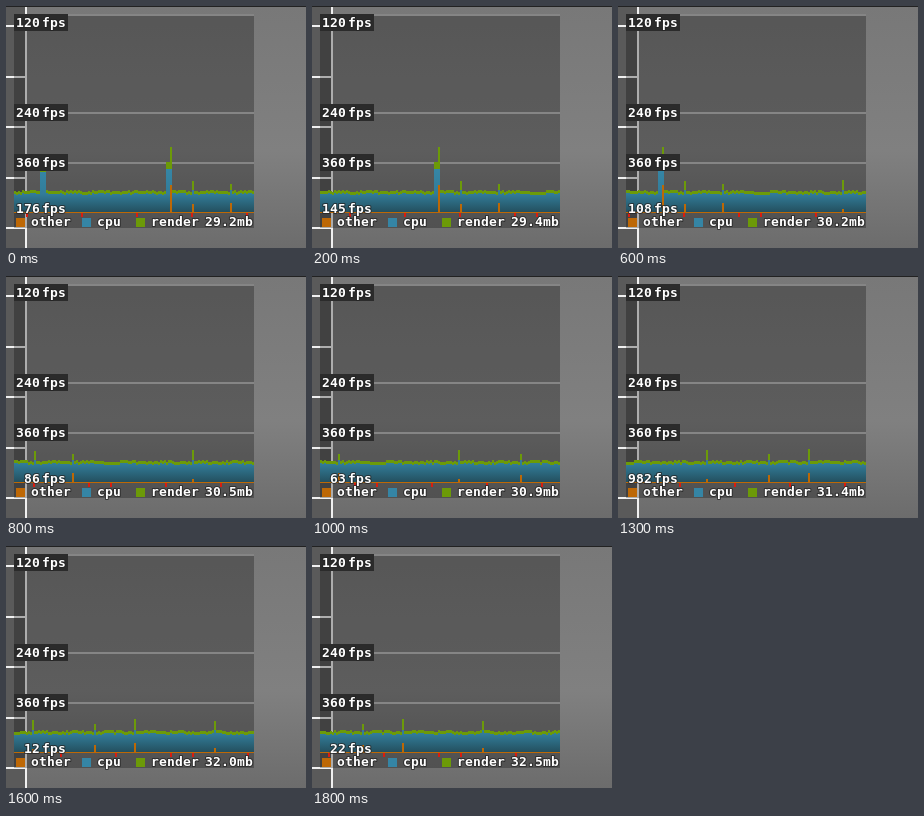
Recreate the animation shown at these times as an HTML page with a canvas. Size 300 px wide and 242 px high, loop 1.9 s.

```html
<!DOCTYPE html>
<html lang="en">
<head>
<meta charset="utf-8">
<title>Frame profiler</title>
<style>
  html, body { margin: 0; width: 100%; height: 100%; overflow: hidden; background: #777; }
  canvas { display: block; }
</style>
</head>
<body>
<canvas id="stage" width="300" height="242"></canvas>
<script>
const ctx = document.getElementById('stage').getContext('2d');
const STEP = 100, LOOP = 1900;
const LEFT = 8, RIGHT = 248, BASE = 207;
const ORANGE = '#bd6806', BLUE = '#3585a5', GREEN = '#6c9a08', LINE = '#f0f0f0';

// Step, frame rate, megabytes; values in between are interpolated.
const readings = [
  [0, 176, 29.2], [2, 145, 29.4], [6, 108, 30.2], [10, 63, 30.9],
  [13, 982, 31.4], [16, 12, 32], [18, 22, 32.5]
];
const hiccups = [186, 224, 344, 406, 446, 526];

const blueFade = ctx.createLinearGradient(0, 166, 0, 206);
blueFade.addColorStop(0, BLUE);
blueFade.addColorStop(.55, '#327c99');
blueFade.addColorStop(1, '#24505f');

function rect(x, y, w, h, color) {
  ctx.fillStyle = color;
  ctx.fillRect(x, y, w, h);
}

function text(value, x, y, align = 'left') {
  ctx.textAlign = align;
  ctx.strokeText(value, x, y);
  ctx.fillStyle = '#fff';
  ctx.fillText(value, x, y);
}

function rate(value, y) {
  text(value, 34, y, 'right');
  text('fps', 36, y);
}

function noise(n) {
  const v = Math.sin(n * 127.1 + 31.7) * 43758.5453;
  return v - Math.floor(v);
}

// Scrolls about 20 px a step, in whole columns with a slight wobble.
function scrollAt(step) {
  return 2 * Math.round(9.9 * step + .5 * Math.sin(.63 * (step - 4)));
}

function readingAt(step) {
  const next = Math.max(1, readings.findIndex(([at]) => at >= step));
  const a = readings[next - 1], b = readings[next];
  const part = (step - a[0]) / (b[0] - a[0]);
  return [1, 2].map(i => a[i] + (b[i] - a[i]) * part);
}

function background() {
  const shade = ctx.createLinearGradient(0, 0, 0, 242);
  shade.addColorStop(0, '#787878');
  shade.addColorStop(.6, '#808080');
  shade.addColorStop(1, '#6c6c6c');
  rect(0, 0, 300, 242, shade);
  rect(0, 0, 20, 242, '#5a5a5a');
  rect(19, 0, 2, 242, LINE);
  for (let i = 0; i < 5; i++) rect(0, Math.floor(19.5 + 50.6 * i), 19, 2, LINE);
  rect(0, 0, 300, 1, '#222');
  rect(LEFT, 8, RIGHT - LEFT, 214, 'rgba(0,0,0,.28)');
  for (const y of [8, 106, 156]) rect(LEFT, y, RIGHT - LEFT, 2, '#858585');
}

// Tops of the green, blue and orange parts of one column.
function tops(world) {
  if (world >= 34 && world < 40) return [164, 166, 206];
  if (world >= 160 && world < 164) return [156, 163, 206];
  if (world === 164) return [141, 163, 179];
  const n = world / 2;
  const green = Math.round(184 + Math.sin(n * .35) * .5 + noise(n) * 2);
  if (!hiccups.includes(world)) return [green, green + 3, 206];
  return [172 + Math.round(noise(n) * 6), 184, 196 + Math.round(noise(n + 9) * 8)];
}

function column(x, world) {
  const [green, blue, orange] = tops(world);
  rect(x, green, 2, blue - green, GREEN);
  rect(x, blue, 2, orange - blue, blueFade);
  rect(x, orange, 2, BASE - orange, ORANGE);
}

// Red marks come in groups of five.
function collections(offset) {
  for (let i = 0; i < 15; i++) {
    const x = 20 + 242 * Math.floor(i / 5) + 55 * (i % 5) - offset;
    if (x >= LEFT && x < RIGHT) rect(x, BASE, 2, 4, '#d81c10');
  }
}

function draw(time) {
  const step = Math.floor(time % LOOP / STEP);
  const offset = scrollAt(step);
  const [fps, memory] = readingAt(step);
  ctx.font = 'bold 13px "DejaVu Sans Mono", monospace';
  ctx.letterSpacing = '0.17px';
  ctx.lineWidth = 2;
  ctx.lineJoin = 'round';
  ctx.strokeStyle = 'rgba(35,35,35,.75)';

  background();
  for (let x = LEFT; x < RIGHT; x += 2) column(x, x + offset);
  collections(offset);

  [[120, 21], [240, 111], [360, 161]].forEach(([value, y]) => {
    rect(LEFT, y - 13, 54, 17, '#2b2b2b');
    rate(value, y);
  });
  rate(Math.round(fps), 207);

  [['other', 10, ORANGE], ['cpu', 76, BLUE], ['render', 130, GREEN]].forEach(([name, x, color]) => {
    rect(x, 212, 9, 9, color);
    text(name, x + 15, 220);
  });
  text(memory.toFixed(1) + 'mb', 199, 220);
}

const start = performance.now();
function frame() {
  draw(performance.now() - start);
  requestAnimationFrame(frame);
}
frame();
</script>
</body>
</html>
```
